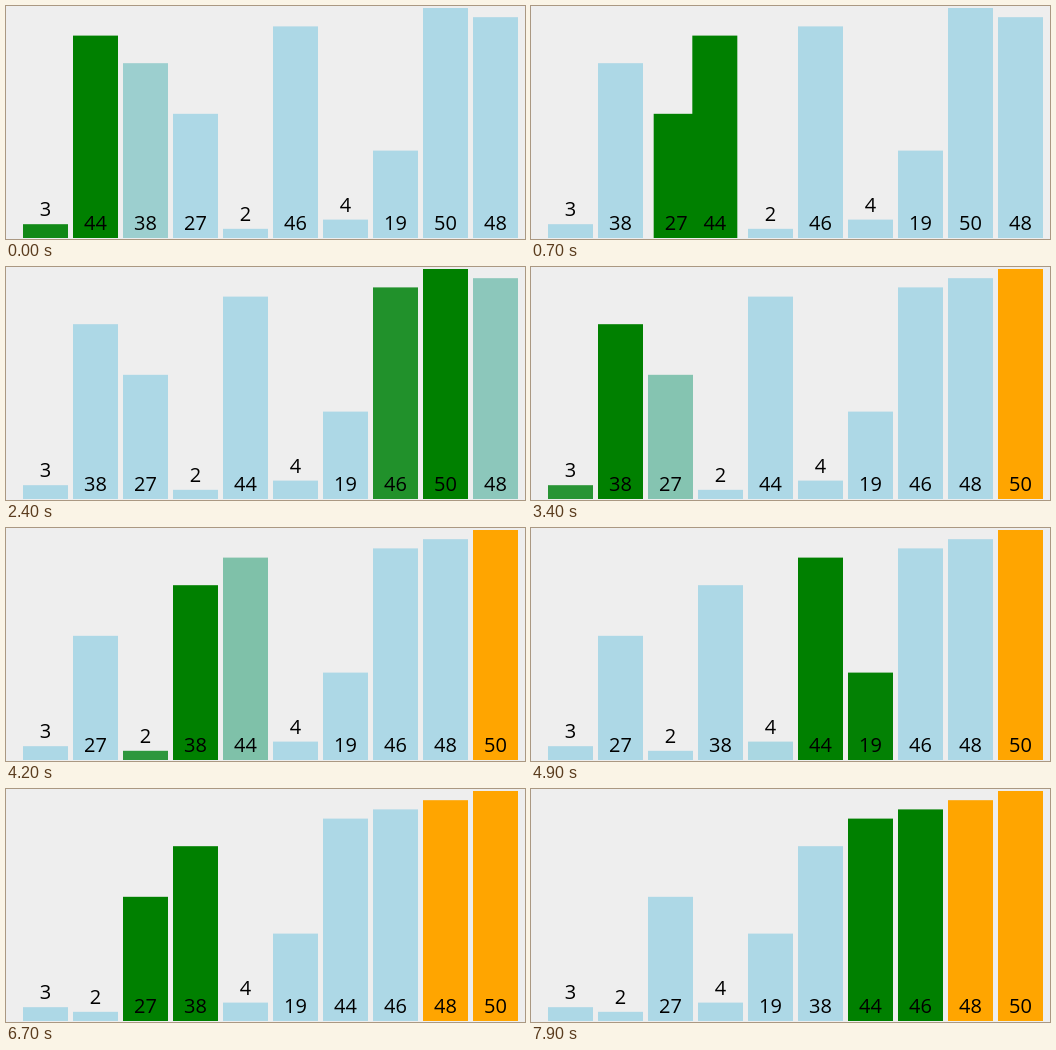
Animation, 519 px wide and 233 px high, one loop 8000 ms. Source, as an HTML page:

```html
<!DOCTYPE html>
<html lang="en">
<head>
<meta charset="utf-8">
<title>Bubble sort</title>
<style>
  html, body { margin: 0; width: 100%; height: 100%; overflow: hidden; background: #eee; }
  svg { display: block; }
  text { font: 20px "Open Sans", "Noto Sans", sans-serif; text-anchor: middle; fill: #000; }
</style>
</head>
<body>
<svg id="stage" width="519" height="233" viewBox="0 0 519 233"></svg>
<script>
const values = [3, 44, 38, 27, 2, 46, 4, 19, 50, 48];
const LOOP = 8000, TICK = 100;
const STEP = 198.8, FADE = 180, LEAD = 37;
const BASE = 232, UNIT = 4.6, LEFT = 17, PITCH = 50, WIDTH = 45;
const IDLE = [173, 216, 230], ACTIVE = [0, 128, 0], DONE = [255, 165, 0];

// One step per comparison, one per swap, two at the end of each pass.
function sortSteps() {
  const steps = [], order = values.map((_, i) => i);
  let end = values.length;
  const push = hot => {
    const bars = [];
    order.forEach((id, slot) => {
      const color = slot >= end ? DONE : slot === hot || slot === hot + 1 ? ACTIVE : IDLE;
      bars[id] = { x: LEFT + PITCH * slot, color };
    });
    steps.push(bars);
  };
  while (end > 1) {
    for (let i = 0; i < end - 1; i++) {
      push(i);
      if (values[order[i]] > values[order[i + 1]]) {
        [order[i], order[i + 1]] = [order[i + 1], order[i]];
        push(i);
      }
    }
    end--;
    push(-2);
    push(-2);
  }
  return steps;
}

const stage = document.getElementById("stage");

function add(parent, tag, attrs = {}) {
  const el = document.createElementNS("http://www.w3.org/2000/svg", tag);
  for (const key in attrs) el.setAttribute(key, attrs[key]);
  return parent.appendChild(el);
}

const bars = values.map(value => {
  const group = add(stage, "g"), height = value * UNIT, top = BASE - height;
  const rect = add(group, "rect", { y: top, width: WIDTH, height });
  const label = add(group, "text", { x: WIDTH / 2, y: (value < 10 ? top : BASE) - 8 });
  label.textContent = value;
  return { group, rect };
});

const steps = sortSteps();
const mix = (a, b, p) => a + (b - a) * p;
const ease = u => (1 - Math.cos(Math.PI * Math.min(u, 1))) / 2;

function draw(time) {
  const clock = time + LEAD, n = Math.floor(clock / STEP);
  const p = ease((clock - n * STEP) / FADE);
  const from = steps[n], to = steps[n + 1];
  bars.forEach(({ group, rect }, id) => {
    const a = from[id], b = to[id];
    const rgb = a.color.map((c, k) => Math.round(mix(c, b.color[k], p)));
    group.setAttribute("transform", `translate(${mix(a.x, b.x, p)} 0)`);
    rect.setAttribute("fill", `rgb(${rgb})`);
  });
}

const start = performance.now();
function frame() {
  const time = (performance.now() - start) % LOOP;
  draw(Math.floor(time / TICK) * TICK);
  requestAnimationFrame(frame);
}
frame();
</script>
</body>
</html>
```
